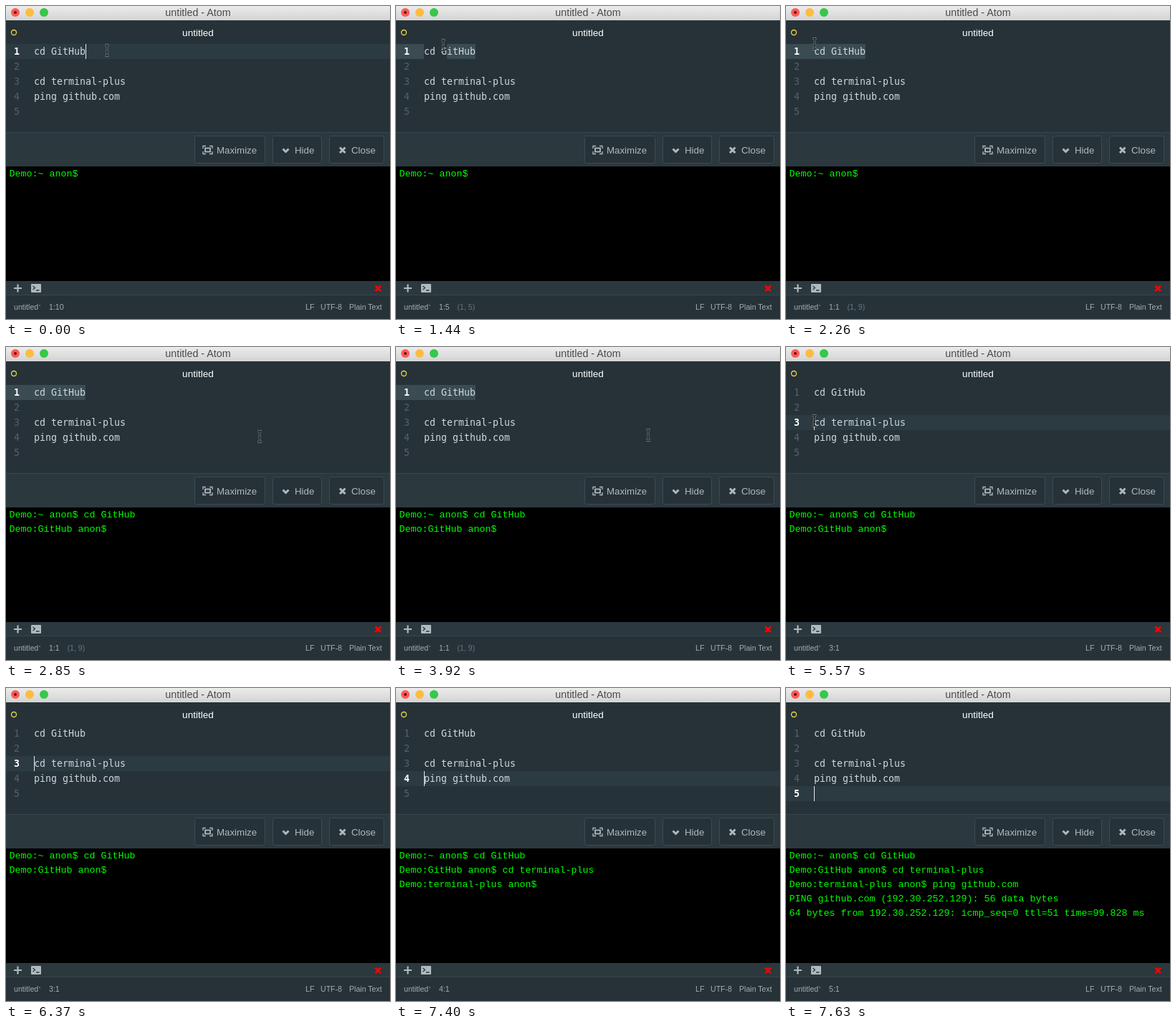
These frames come from a looping animation (536 px wide and 437 px high, 7.99 s). An HTML page:

```html
<!DOCTYPE html>
<html lang="en">
<head>
<meta charset="utf-8">
<title>Editor with terminal panel</title>
<style>
  html, body { margin: 0; width: 100%; height: 100%; overflow: hidden; background: #263238; }
  svg { display: block; width: 536px; height: 437px; }
  text { font-family: "Liberation Sans", Arial, sans-serif; }
  .code text { font: 13.29px "DejaVu Sans Mono", monospace; fill: #cfd8dc; }
  .code .num { fill: #52636b; text-anchor: end; }
  .code .num.on { fill: #fff; font-weight: bold; }
  .term text { font: 13.33px "Liberation Mono", "Courier New", monospace; fill: #0f0; }
  .status text { font-size: 10.6px; fill: #a3adb2; }
  .button rect { fill: #263238; stroke: #3c4b52; }
  .button text { font-size: 13.3px; fill: #b0b9be; }
  .icon { fill: none; stroke: #b0b9be; }
</style>
</head>
<body>
<svg viewBox="0 0 536 437">
  <defs>
    <linearGradient id="chrome" x2="0" y2="1">
      <stop stop-color="#ececec"/><stop offset="1" stop-color="#d3d3d3"/>
    </linearGradient>
  </defs>

  <rect width="536" height="437" fill="#263238"/>
  <rect width="536" height="20" fill="url(#chrome)"/>
  <circle cx="13" cy="9" r="6" fill="#fc5b57"/>
  <circle cx="13" cy="9" r="2" fill="#6b0d0b"/>
  <circle cx="33" cy="9" r="6" fill="#fdbc40"/>
  <circle cx="53" cy="9" r="6" fill="#35c84a"/>
  <text x="268" y="14" text-anchor="middle" font-size="14.3" fill="#4a4a4a">untitled - Atom</text>
  <circle cx="11" cy="37" r="3.5" fill="none" stroke="#f0d84a" stroke-width="1.3"/>
  <text x="268" y="41.5" text-anchor="middle" font-size="13.6" fill="#fff">untitled</text>

  <rect id="row" width="536" height="21" fill="#2c3a41"/>
  <rect id="gutter" y="53" width="39" height="21" fill="#3a4b52"/>
  <rect id="selection" y="53" height="21" fill="#3a4b52"/>
  <g class="code" id="code"></g>
  <rect id="caret" width="1" height="21" fill="#e4eaec"/>

  <rect y="176" width="536" height="48" fill="#2b383e"/>
  <rect y="176" width="536" height="1" fill="#37464d"/>
  <g class="button">
    <rect x="263.5" y="181.5" width="98" height="38" rx="3"/>
    <text x="294" y="206">Maximize</text>
    <rect x="372.5" y="181.5" width="68" height="38" rx="3"/>
    <text x="403" y="206">Hide</text>
    <rect x="451.5" y="181.5" width="76" height="38" rx="3"/>
    <text x="482" y="206">Close</text>
  </g>
  <g class="icon">
    <path d="M275 199v-3.500h4M284 195.500h4v3.500M288 203v3.500h-4M279 206.500h-4v-3.500" stroke-width="1.3"/>
    <rect x="278" y="198.500" width="7" height="5" stroke-width="1.8"/>
    <path d="M386.500 199.500l4 4 4-4" stroke-width="3"/>
    <path d="M466 197.500l7.500 7.500m0-7.500l-7.500 7.500" stroke-width="3"/>
  </g>

  <rect y="224" width="536" height="160" fill="#000"/>
  <g class="term" id="term"></g>

  <rect y="384" width="536" height="19" fill="#2b383e"/>
  <rect y="403" width="536" height="1" fill="#37464d"/>
  <path class="icon" d="M11 394h11M16.500 388.500v11" stroke-width="2.2"/>
  <rect x="35" y="388" width="14" height="12" rx="1" fill="#b0b9be"/>
  <path d="M37.500 391l3 2.500-3 2.500M42 397h4.500" fill="none" stroke="#2b383e" stroke-width="1.3"/>
  <path d="M515.500 390.500l7.500 7.500m0-7.500l-7.500 7.500" fill="none" stroke="#f00" stroke-width="2.800"/>
  <g class="status">
    <text x="11" y="424">untitled</text>
    <circle cx="47" cy="418" r=".8" fill="#a3adb2"/>
    <text id="place" x="60" y="424"></text>
    <text id="span" x="85.500" y="424" style="fill:#68777e"></text>
    <text x="418" y="424">LF</text>
    <text x="439" y="424">UTF-8</text>
    <text x="479" y="424">Plain Text</text>
  </g>

  <g id="mouse" fill="none">
    <path d="M-3 -7.500h2l1 1 1-1h2M0 -6.500v13M-3 7.500h2l1-1 1 1h2M-2 2h4" stroke="#aab3b7" stroke-width="2.600" opacity=".75"/>
    <path d="M-3 -7.500h2l1 1 1-1h2M0 -6.500v13M-3 7.500h2l1-1 1 1h2M-2 2h4" stroke="#0c1012" stroke-width="1.200"/>
  </g>
</svg>

<script>
const LOOP = 7990, LEFT = 39, CHAR = 8, LINE = 21;
const $ = id => document.getElementById(id);
const rowTop = line => 53 + (line - 1) * LINE;
const colX = col => LEFT + (col - 1) * CHAR;

const source = ["cd GitHub", "", "cd terminal-plus", "ping github.com", ""];
const ip = "192.30.252.129";
const output = [
  "Demo:~ anon$",
  "Demo:GitHub anon$",
  "Demo:terminal-plus anon$",
  `PING github.com (${ip}): 56 data bytes`,
  `64 bytes from ${ip}: icmp_seq=0 ttl=51 time=99.828 ms`
];
const commands = [source[0], source[2], source[3]];

// Each step changes only the listed parts of the state.
const steps = [
  [0, { line: 1, col: 10, selected: 0, caret: true, mouse: [141, 62], ran: 0, shown: 1 }],
  [120, { caret: false }],
  [600, { caret: true }],
  [960, { caret: false }],
  [1200, { mouse: [131, 60] }],
  [1320, { mouse: [97, 56], col: 8, selected: 2 }],
  [1440, { mouse: [66, 55], col: 5, selected: 5 }],
  [1560, { mouse: [56, 54], col: 3, selected: 7 }],
  [1680, { mouse: [50, 54] }],
  [1790, { mouse: [46, 53], col: 2, selected: 8 }],
  [1910, { mouse: [43, 53] }],
  [2030, { mouse: [42, 53] }],
  [2140, { mouse: [41, 53], col: 1, selected: 9 }],
  [2260, { mouse: [40, 53] }],
  [2620, { ran: 1, shown: 2 }],
  [2740, { mouse: [215, 92] }],
  [2850, { mouse: [354, 125] }],
  [3920, { mouse: [352, 123] }],
  [4040, { mouse: [318, 112] }],
  [4160, { mouse: [250, 94] }],
  [4280, { mouse: [175, 82] }],
  [4390, { mouse: [112, 80] }],
  [4510, { mouse: [74, 92] }],
  [4630, { mouse: [58, 103] }],
  [4750, { mouse: [53, 103] }],
  [4870, { mouse: [49, 103] }],
  [4990, { mouse: [46, 103] }],
  [5100, { mouse: [43, 103] }],
  [5220, { mouse: [41, 103] }],
  [5340, { mouse: [39.5, 103] }],
  [5570, { line: 3, selected: 0, caret: true }],
  [5930, { mouse: [250, 114], caret: false }],
  [6050, { mouse: [526, 128] }],
  [6170, { mouse: null }],
  [6370, { caret: true }],
  [6570, { line: 4, ran: 2, shown: 3 }],
  [7040, { caret: false }],
  [7400, { caret: true }],
  [7520, { line: 5, ran: 3 }],
  [7630, { shown: 5 }]
];

function addText(parent, x, y, content, className = "") {
  const el = document.createElementNS("http://www.w3.org/2000/svg", "text");
  el.setAttribute("x", x);
  el.setAttribute("y", y);
  el.setAttribute("class", className);
  el.textContent = content;
  return parent.appendChild(el);
}

const numbers = source.map((content, i) => {
  const y = rowTop(i + 1) + 15;
  addText($("code"), LEFT, y, content);
  return addText($("code"), 19, y, i + 1, "num");
});
const termLines = output.map((_, i) => addText($("term"), 4.5, 238 + i * 20, ""));

function set(id, attrs) {
  for (const name in attrs) $(id).setAttribute(name, attrs[name]);
}
const visibility = on => on ? "visible" : "hidden";

function draw(time) {
  const state = Object.assign({}, ...steps.filter(s => s[0] <= time).map(s => s[1]));
  const { line, col, selected, caret, mouse, ran, shown } = state;
  const y = rowTop(line), x = colX(col);

  set("row", { y, visibility: visibility(!selected) });
  set("gutter", { visibility: visibility(selected) });
  set("selection", { x, width: selected * CHAR });
  set("caret", { x, y, visibility: visibility(caret) });
  numbers.forEach((el, i) => el.classList.toggle("on", i + 1 === line));

  termLines.forEach((el, i) => {
    const command = i < ran ? " " + commands[i] : "";
    el.textContent = i < shown ? output[i] + command : "";
  });
  $("place").textContent = `${line}:${col}`;
  $("span").textContent = selected ? `(1, ${selected})` : "";

  set("mouse", { visibility: visibility(mouse) });
  if (mouse) set("mouse", { transform: `translate(${mouse})` });
}

const start = performance.now();
function tick(now) {
  draw(Math.max(0, now - start) % LOOP);
  requestAnimationFrame(tick);
}
draw(0);
requestAnimationFrame(tick);
</script>
</body>
</html>
```
